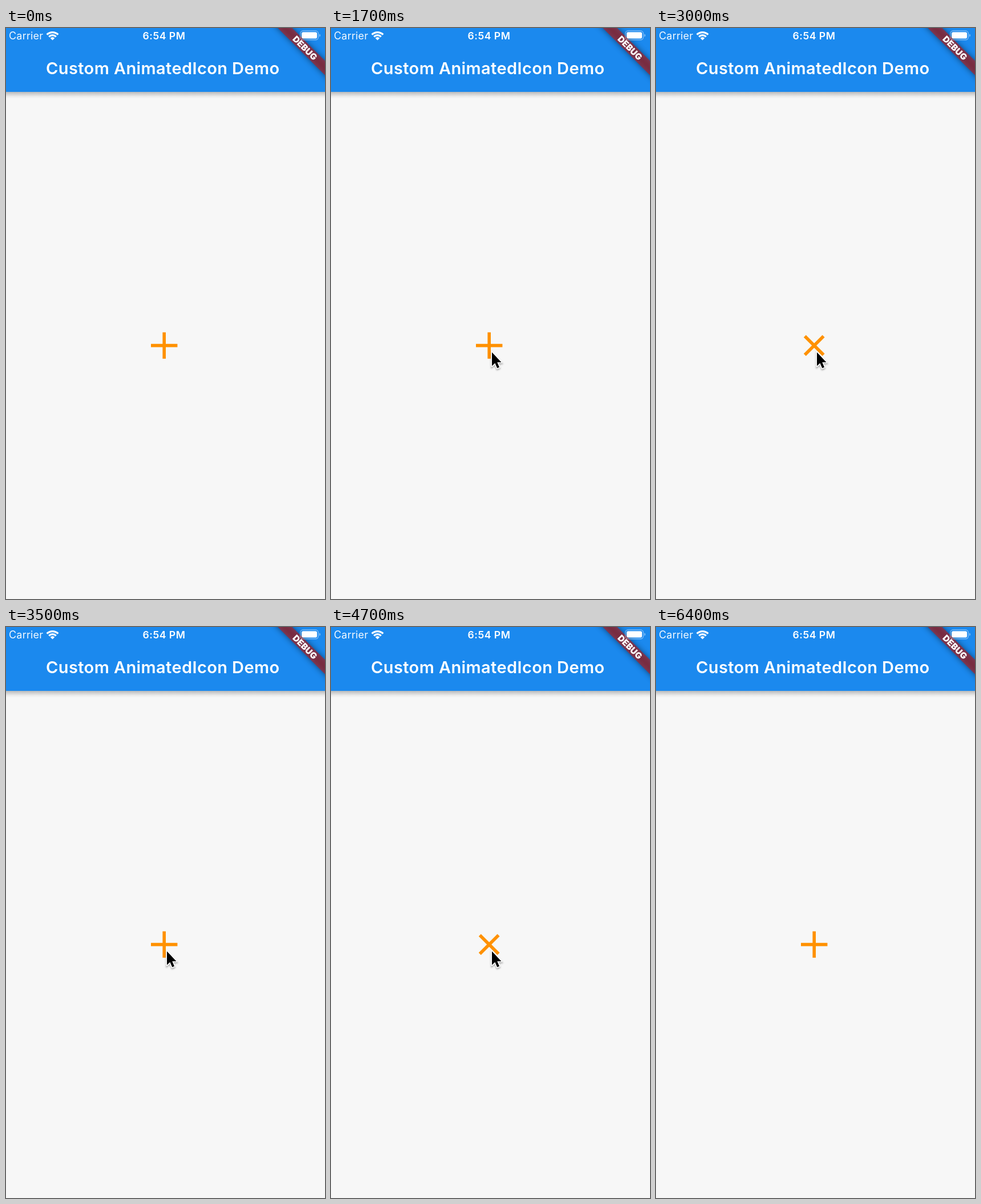
These frames come from a looping animation (559x1001 px, 6.5 s). An HTML page:

```html
<!DOCTYPE html>
<html lang="en">
<head>
<meta charset="utf-8">
<title>Custom AnimatedIcon Demo</title>
<style>
  html, body { margin: 0; width: 100%; height: 100%; overflow: hidden; background: #f7f7f7; }
  svg { display: block; width: 100vw; height: 100vh; }
  text { font-family: Inter, Roboto, sans-serif; fill: #fff; }
</style>
</head>
<body>
<svg viewBox="0 0 559 1001">
  <defs>
    <linearGradient id="shade" x1="0" y1="0" x2="0" y2="1">
      <stop offset="0" stop-color="#000" stop-opacity=".25"/>
      <stop offset=".35" stop-color="#000" stop-opacity=".14"/>
      <stop offset=".7" stop-color="#000" stop-opacity=".04"/>
      <stop offset="1" stop-color="#000" stop-opacity="0"/>
    </linearGradient>
    <filter id="blur" x="-50%" y="-150%" width="200%" height="400%">
      <feGaussianBlur stdDeviation="5.5"/>
    </filter>
    <filter id="soft" x="-50%" y="-50%" width="200%" height="200%">
      <feGaussianBlur stdDeviation="1.6"/>
    </filter>
  </defs>

  <rect width="559" height="1001" fill="#f7f7f7"/>
  <rect y="112" width="559" height="12" fill="url(#shade)"/>
  <rect width="559" height="112" fill="#1b89ee"/>
  <text x="70" y="81" font-size="29" font-weight="600" letter-spacing=".4">Custom AnimatedIcon Demo</text>

  <g transform="translate(559 0) rotate(45)">
    <rect x="-90" y="40.7" width="180" height="17.8" opacity=".5" filter="url(#blur)"/>
    <rect x="-90" y="40.7" width="180" height="17.8" fill="#b71c1c" fill-opacity=".627"/>
    <text y="55.1" font-size="15.2" font-weight="900" text-anchor="middle">DEBUG</text>
  </g>

  <text x="5" y="20" font-size="18" letter-spacing=".2" fill-opacity=".95">Carrier</text>
  <text x="277" y="20" font-size="17.6" font-weight="600" letter-spacing=".5" text-anchor="middle">6:54 PM</text>
  <g id="wifi" transform="translate(81.5 21.5)"></g>
  <rect x="515.7" y="5" width="31.6" height="15.8" rx="4.8" fill="none" stroke="#fff" stroke-opacity=".42" stroke-width="1.4"/>
  <rect x="518" y="7.3" width="27" height="11.2" rx="2.8" fill="#fff"/>
  <path d="M549 10.3q2 .8 2 2.7t-2 2.7z" fill="#fff" fill-opacity=".45"/>

  <circle id="ink" cx="277" cy="556.5" r="65" fill="#bcbcbc"/>
  <path id="icon" d="M-23.2 0H23.2M0-23.2V23.2" stroke="#ff9100" stroke-width="5.6"/>
  <g id="cursor">
    <path d="M0 0V24L5.4 18.9L9.2 27.8L13 26.2L9.3 17.4H16.5Z" transform="translate(0 2)" stroke="#000" stroke-width="3" opacity=".35" filter="url(#soft)"/>
    <path d="M0 0V24L5.4 18.9L9.2 27.8L13 26.2L9.3 17.4H16.5Z" stroke="#fff" stroke-width="3.4" stroke-linejoin="round" paint-order="stroke"/>
  </g>
</svg>
<script>
  const LOOP = 6500, STEP = 100;
  const HOLD = 120, FADE = 200, TURN = 300;
  const taps = [1950, 3140, 3950, 4990];
  // time, x, y of the pointer tip
  const path = [
    [800, 330, 958], [900, 301, 660], [1000, 288, 576.5],
    [1300, 282, 568.5], [5300, 282, 568.5], [5400, 286, 610], [5500, 304, 835]
  ];
  const $ = id => document.getElementById(id);
  const clamp = v => Math.max(0, Math.min(1, v));
  const lerp = (a, b, k) => a + (b - a) * k;

  // Quarter-circle ring between two radii, opening upward
  function ring(inner, outer) {
    const a = inner * Math.SQRT1_2, b = outer * Math.SQRT1_2;
    return `<path fill="#fff" d="M${-b} ${-b}A${outer} ${outer} 0 0 1 ${b} ${-b}` +
      `L${a} ${-a}A${inner} ${inner} 0 0 0 ${-a} ${-a}Z"/>`;
  }
  $('wifi').innerHTML = ring(0, 5.4) + ring(7.2, 10.4) + ring(12.2, 15.6);

  function pointer(t) {
    const last = path[path.length - 1];
    if (t < path[0][0] || t > last[0]) return null;
    const i = path.findIndex(p => p[0] >= t);
    const a = path[Math.max(0, i - 1)], b = path[i];
    const k = a === b ? 0 : (t - a[0]) / (b[0] - a[0]);
    return [lerp(a[1], b[1], k), lerp(a[2], b[2], k)];
  }

  function inkLevel(t) {
    return Math.max(...taps.map(tap => t < tap
      ? clamp((t - tap + HOLD) / HOLD)
      : clamp(1 - (t - tap) / FADE)));
  }

  // 0 is a plus, 1 is a cross; each tap toggles
  function crossLevel(t) {
    return taps.reduce((sum, tap, i) =>
      sum + (i % 2 ? -1 : 1) * clamp((t - tap) / TURN), 0);
  }

  function draw(t) {
    const f = crossLevel(t);
    // Corners travel in straight lines, so the bars shrink midway
    const c = lerp(1, Math.SQRT1_2, f), s = f * Math.SQRT1_2;
    $('icon').setAttribute('transform', `matrix(${c} ${-s} ${s} ${c} 277.2 556.6)`);
    $('ink').setAttribute('opacity', 0.43 * inkLevel(t));
    const tip = pointer(t);
    $('cursor').setAttribute('visibility', tip ? 'visible' : 'hidden');
    if (tip) $('cursor').setAttribute('transform', `translate(${tip})`);
  }

  const start = performance.now();
  function tick() {
    const t = (performance.now() - start) % LOOP;
    draw(Math.floor(t / STEP) * STEP);
    requestAnimationFrame(tick);
  }
  draw(0);
  requestAnimationFrame(tick);
</script>
</body>
</html>
```
